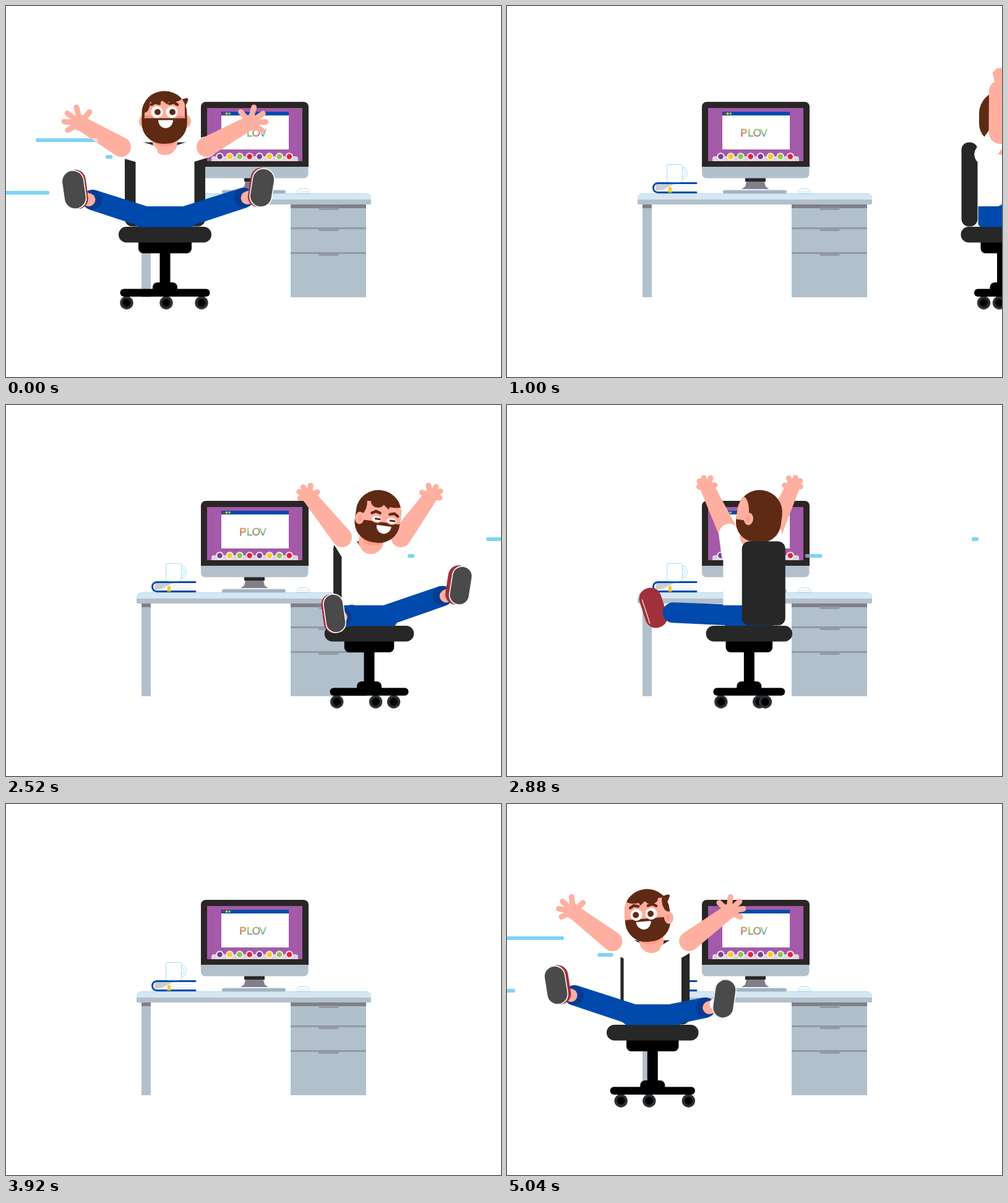
An HTML page with a canvas that plays this animation: 800 px wide and 600 px high, repeating every 5.08 s.

```html
<!DOCTYPE html>
<html lang="en">
<head>
<meta charset="utf-8">
<title>Office chair spin</title>
<style>
html, body { margin: 0; width: 100%; height: 100%; overflow: hidden; background: #fff; }
canvas { display: block; width: 100vw; height: 100vh; }
</style>
</head>
<body>
<canvas id="stage" width="800" height="600"></canvas>
<script>
const g = document.getElementById('stage').getContext('2d');
const LOOP = 5080, STEP = 40, SPEED = 0.5435, SPIN = 0.45, RAD = Math.PI / 180;
const SKIN = '#ffaf9f', HAIR = '#5f2a14', BLUE = '#004aad', CUFF = '#083b92', RED = '#a0303c',
  DARK = '#272727', STEEL = '#b2c0cb', EDGE = '#9299a6', SHADE = '#807f8a', GLOW = '#8dd3f4';

// Limb poses for every 18 degrees of turn, from facing front to facing away
const ARMS = {
  left: {
    endX: [-71, -59, -44, -26, -12, -3, 15, 32, 49, 60, 69],
    handX: [-137, -123, -97, -60, -34, -4, 30, 68, 105, 128, 137]
  },
  right: {
    endX: [67, 65, 51, 38, 15, -3, -15, -36, -57, -64, -69],
    handX: [137, 128, 99, 62, 30, -4, -40, -70, -107, -126, -137]
  },
  endY: [228, 222, 214, 209, 206, 204, 206, 209, 213, 222, 228],
  handY: [189, 174, 148, 131, 131, 138, 131, 133, 150, 174, 189],
  reach: [27, 25, 19, 16, 25, 34, 25, 17, 19, 25, 27]
};
const LEGS = {
  left: {
    x: [-147, -116, -56, 6, 55, 100, 130, 155, 168, 168, 152],
    y: [297, 315, 337, 349, 350, 345, 338, 328, 310, 303, 297]
  },
  right: {
    x: [157, 156, 148, 138, 115, 85, 40, -25, -88, -130, -152],
    y: [294, 293, 292, 290, 288, 285, 283, 283, 286, 291, 297]
  }
};

function at(keys, deg) {
  const p = deg / 18, i = Math.min(Math.floor(p), keys.length - 2);
  return keys[i] + (keys[i + 1] - keys[i]) * (p - i);
}
function box(x, y, w, h, color, r = 0) {
  g.fillStyle = color;
  g.beginPath();
  g.roundRect(x, y, w, h, r);
  g.fill();
}
function oval(x, y, rx, ry, color, sweep = 7) {
  g.fillStyle = color;
  g.beginPath();
  g.ellipse(x, y, rx, ry, 0, 0, sweep);
  g.fill();
}
const disc = (x, y, r, color) => oval(x, y, r, r, color);
function poly(points, color) {
  g.fillStyle = color;
  g.beginPath();
  points.forEach(p => g.lineTo(...p));
  g.fill();
}
function line(points, color, width) {
  g.strokeStyle = color;
  g.lineWidth = width;
  g.lineCap = g.lineJoin = 'round';
  g.beginPath();
  points.forEach(p => g.lineTo(...p));
  g.stroke();
}
// Tapered capsule between two circles
function limb(x1, y1, r1, x2, y2, r2, color) {
  const d = Math.atan2(y2 - y1, x2 - x1), len = Math.hypot(x2 - x1, y2 - y1) || 1;
  const k = Math.acos(Math.max(-1, Math.min(1, (r1 - r2) / len)));
  g.fillStyle = color;
  g.beginPath();
  g.arc(x1, y1, r1, d + k, d - k + 2 * Math.PI);
  g.arc(x2, y2, r2, d - k, d + k);
  g.fill();
}

function drawDesk() {
  box(219, 320, 15, 151, STEEL);
  box(219, 320, 15, 7, SHADE);
  box(460, 320, 122, 151, STEEL);
  box(460, 320, 122, 7, SHADE);
  box(460, 327, 1, 144, GLOW);
  for (const y of [327, 361, 401]) {
    if (y > 327) box(460, y - 3, 122, 3, EDGE);
    box(505, y - 1, 33, 4, EDGE, [0, 0, 3, 3]);
  }
  box(211, 303, 379, 18, STEEL, [8, 8, 2, 2]);
  box(211, 303, 379, 10, '#d6e6f2', [8, 8, 0, 0]);
  line([[218, 303.5], [582, 303.5]], GLOW, 0.6);
}

function drawComputer() {
  box(385, 278, 33, 6, '#2b2626');
  poly([[387, 284], [416, 284], [418, 292], [425, 297], [378, 297], [385, 292]], SHADE);
  box(349, 298, 103, 5, '#a7b2bf', 2);
  box(353, 296, 96, 2, '#e4f3fb');
  box(315, 250, 173.5, 28.5, STEEL, [0, 0, 7, 7]);
  box(315, 155, 174, 105, '#2b2626', [8, 8, 0, 0]);
  box(325, 165, 154, 86, '#a45aa8');
  box(348, 171, 109, 61, '#fff');
  box(348, 171, 109, 6, BLUE);
  ['#e8203c', '#ffd02a', '#8bc84a'].forEach((c, i) => disc(352 + i * 4.6, 174, 1.9, c));
  g.font = '17px "Liberation Sans", Arial, sans-serif';
  g.textAlign = 'center';
  [...'PLOV'].forEach((ch, i) => {
    const x = 383 + i * 10.7, fade = g.createLinearGradient(0, 198, 0, 211);
    fade.addColorStop(0, ['#ff9d2e', '#ffc81f', '#8bc84a', '#ffd02a'][i]);
    fade.addColorStop(1, ['#e84c3c', '#5cb85c', '#e8503c', '#3fa9e0'][i]);
    g.lineWidth = 0.8;
    g.strokeStyle = GLOW;
    g.strokeText(ch, x, 210.5);
    g.fillStyle = fade;
    g.fillText(ch, x, 210.5);
  });
  box(332, 243, 140, 8, '#ddd4df', [4, 4, 0, 0]);
  for (let i = 0; i < 8; i++) {
    const x = 345.5 + i * 16.05;
    disc(x, 243.5, 6.2, '#f4eef4');
    disc(x, 243.5, 4.3, ['#7b3f9c', '#ffc91f', '#8bc84a', '#e8203c'][i % 4]);
  }
}

function drawClutter() {
  box(470.5, 295.5, 20, 7.5, '#fff', [9, 9, 2, 2]);
  g.strokeStyle = GLOW;
  g.lineWidth = 0.8;
  g.stroke();
  line([[474, 300], [488, 300]], '#d5dce3', 1);

  box(240, 287, 66, 14, '#fff', [6, 0, 0, 6]);
  poly([[241, 288], [270, 288], [252, 297], [240, 299]], '#c9ccd2');
  line([[262, 292], [300, 292]], '#e3e8ed', 1);
  line([[255, 296], [300, 296]], '#e3e8ed', 1);
  g.strokeStyle = BLUE;
  g.lineWidth = 3;
  g.beginPath();
  g.moveTo(306, 286.5);
  g.lineTo(244, 286.5);
  g.bezierCurveTo(234, 286.5, 234, 301.5, 244, 301.5);
  g.lineTo(306, 301.5);
  g.stroke();
  poly([[261, 293], [266, 293], [266, 303], [263.5, 301], [261, 303]], '#ffc91f');

  g.strokeStyle = GLOW;
  g.lineWidth = 0.8;
  for (const r of [8.5, 5]) {
    g.beginPath();
    g.ellipse(283, 270, r, r + 1.5, 0, -1.6, 1.6);
    g.stroke();
  }
  box(258.5, 256.5, 25, 28.5, '#fff', [1, 1, 5, 5]);
  g.stroke();
}

function drawBase(a, flip) {
  const t = 1 - Math.abs(a - 90) / 90, e = t ** 1.3, c2 = Math.cos(a * RAD) ** 2;
  const half = 72.5 - 27 * t ** 1.2, under = 70 + 16 * c2;
  for (const x of [-62 + 32 * e, 2 + 28 * e, 59 - 64 * e]) {
    disc(x * flip, 480, 10.7, '#2a3136');
    disc(x * flip, 480, 6.5, '#000');
  }
  box(-half, 457.5, half * 2, 12.5, '#000', 6);
  box(-20, 447, 40, 14, '#000', [8, 8, 0, 0]);
  box(-8.5, 396, 17, 56, '#000');
  box(-under / 2, 376, under, 24, '#000', [0, 0, 8, 8]);
}
function drawSeat(a) {
  const w = 134 + 16 * Math.cos(a * RAD) ** 2;
  box(-w / 2, 357, w, 25.5, DARK, 12.5);
}
function drawBackrest(a) {
  const t = 1 - Math.abs(a - 90) / 90, w = 130 - 104 * t ** 1.08;
  box(-53 * t ** 1.6 - w / 2, 220.5, w, 136, DARK, 12);
}

function drawArm(side, a, sleeveOnTop) {
  const x = at(side.endX, a), y = at(ARMS.endY, a), hx = at(side.handX, a), hy = at(ARMS.handY, a);
  const dir = Math.atan2(hy - y, hx - x), turn = hx < x ? 1 : -1, reach = at(ARMS.reach, a);
  const profile = Math.max(0, 1 - Math.abs(a - 90) / 30), fan = 1 - 0.8 * profile;
  const sleeve = () => limb(Math.sign(x) * 28, 240, 17, x, y, 17, '#fff');
  if (!sleeveOnTop) sleeve();
  limb(x, y, 16 + 3 * profile, hx, hy, 11.5 + 6 * profile, SKIN);
  [-61, -26, 6, 46, 100].forEach((deg, i) => {
    const d = dir + deg * RAD * turn * fan, r = reach - (i % 4 ? 1 : 4);
    line([[hx, hy], [hx + r * Math.cos(d), hy + r * Math.sin(d)]], SKIN, 9);
  });
  disc(hx, hy, 6 + reach * 0.26, SKIN);
  if (sleeveOnTop) sleeve();
}

function drawLeg(side, a, sign) {
  const s = Math.sin(a * RAD), x = at(side.x, a), y = at(side.y, a), back = a > 90;
  const hip = sign * 35 * Math.cos(a * RAD);
  const k = 32 / Math.max(70, Math.hypot(hip - x, 340 - y));
  const cx = x + (hip - x) * k, cy = y + (340 - y) * k + 5;
  const tilt = (back ? (sign < 0 ? 18 : -20) : (sign < 0 ? -8 : 9)) * RAD;
  const pants = () => limb(hip, 340, 17, cx, cy, 16.5, BLUE);
  const shoe = () => {
    g.save();
    g.translate(x, y);
    g.rotate(tilt);
    if (back) {
      box(-18, -33, 36, 66, RED, 17);
      if (sign < 0) line([[13, -18], [13, 22]], '#e8d0d2', 1.5);
    } else {
      const off = sign < 0 ? 4 - 11 * s : -4 - 3 * s, half = 17 - 3 * s;
      box(off - 17, -32, 34, 64, RED, 17);
      box(-half - 1.5, -32, half * 2 + 3, 64, '#fff', half + 1);
      box(-half, -30.5, half * 2, 61, '#4a4a4a', half);
    }
    g.restore();
  };
  if (back) {
    shoe();
    pants();
    return;
  }
  pants();
  disc(cx, cy, 15.5, CUFF);
  limb(cx - (cx - x) * 0.2, cy, 10.5, x, y + 8, 10, SKIN);
  const sx = x + (cx - x) * 0.45, sy = y + (cy - y) * 0.6;
  limb(sx, sy, 10, x, y + 8, 10, '#fff');
  shoe();
}

function drawTorso(a) {
  const half = 39 + 8.5 * Math.cos(a * RAD) ** 2;
  box(-half, 228, half * 2, 97, '#fff', [22, 22, 0, 0]);
  box(-half, 324, half * 2, 33.5, BLUE, [0, 0, 6, 6]);
}

function drawFace(s) {
  const f = 18 * s, ey = -9 + 21 * s, squint = s > 0.5, tone = '#ff8f85';
  oval(f - 25, ey + 11, 8, 6, tone);
  oval(f + 26, ey + 11, 8, 6, tone);
  box(-40, 1 + 12 * s, 80, 60, HAIR);
  for (const side of [-1, 1]) {
    const x = f + side * 12, bx = x + side * 3, lift = squint ? 4 : 0;
    if (squint) {
      oval(x, ey, 9.5, 7, SKIN);
      oval(x, ey + 0.5, 8, 4.5, '#fff');
      line([[x - 2, ey + 0.5], [x + 5, ey + 0.5]], HAIR, 3);
    } else {
      disc(x, ey, 9.5, '#fff');
      disc(x + 1, ey, 5, HAIR);
    }
    line([[bx + side * 6, ey - 12 + lift], [bx, ey - 15.5 + lift], [bx - side * 7, ey - 13.5 + lift]], HAIR, 4.5);
  }
  oval(f * 0.9 + 2, 4 + 16 * s, 12, 13, '#fff', Math.PI);
}

function drawHead(a, flip) {
  const s = Math.sin(a * RAD), c = Math.cos(a * RAD), sway = Math.sin(2 * a * RAD);
  const ear = c < 0 ? -28 * c : -36 * c, front = a < 10;
  limb(sway * 5, 212, 20, sway * 3, 221, a > 90 ? 12 : 20, SKIN);
  if (a <= 90) oval(sway * 8, 219, 17, 8, '#ff9a8c');
  g.save();
  g.translate(16 * sway - 1, 180.5);
  g.rotate(8 * sway * RAD);
  if (front) {
    oval(-34, 6, 7, 10, SKIN);
    oval(36, 6, 7, 10, SKIN);
  }
  if (a < 30) limb(flip * 30, -24, 6, flip * 36, -29, 2.5, HAIR);
  g.save();
  g.beginPath();
  g.roundRect(-36.5, -43, 73, 85, [36, 36, 33, 33]);
  g.clip();
  box(-40, -45, 80, 90, HAIR);
  const left = front ? -32 : ear;
  if (a <= 100) {
    const f = 18 * s, top = -31 + 13 * s;
    box(left, top, (front ? 33 : 40) - left, 60, SKIN);
    drawFace(s);
    // Fringe and sideburn
    oval(left, top + 6, 9, 17, HAIR);
    oval(f - 14, top, 11, 9, HAIR);
    oval(f + 12, top - 1, 16, 7, HAIR);
    poly([[f - 8, top], [f + 8, top], [f + 5, top + 10]], HAIR);
  } else if (ear < 34) {
    oval(ear + 16, -2, 15, 28, SKIN);
    box(ear - 2, 9, 40, 40, HAIR, 8);
  }
  g.restore();
  if (!front && a < 165) {
    oval(ear, 6, 7.5, 10, SKIN);
    oval(ear + 1, 6, 3, 5, '#ff9a8c');
  }
  g.restore();
}

function drawMan(x, yaw) {
  const turn = ((yaw + 180) % 360 + 360) % 360 - 180, a = Math.abs(turn), flip = turn < 0 ? -1 : 1;
  g.save();
  g.translate(x, 0);
  g.scale(flip, 1);
  if (a <= 90) {
    drawBase(a, 1);
    drawBackrest(a);
    drawSeat(a);
    drawArm(ARMS.right, a, false);
    drawTorso(a);
    drawLeg(LEGS.right, a, 1);
    drawLeg(LEGS.left, a, -1);
    drawHead(a, flip);
    drawArm(ARMS.left, a, false);
  } else {
    drawLeg(LEGS.right, a, 1);
    drawLeg(LEGS.left, a, -1);
    drawArm(ARMS.right, a, true);
    drawArm(ARMS.left, a, true);
    drawTorso(a);
    drawHead(a, flip);
    drawBase(a, -1);
    drawBackrest(a);
    drawSeat(a);
  }
  g.restore();
}

// Speed streaks: the head shoots forward, the tail catches up
function streak(s, t, dir) {
  const q = (t - s.start) / s.period, k = Math.floor(q), r = 1 - q + k;
  const goal = s.goal + dir * s.shift * k;
  const head = goal - dir * s.head * r ** s.pow;
  const gap = Math.max(5, s.tail * r * r - s.head * r ** s.pow);
  return [[head - dir * 3, s.y], [head - dir * (gap + 3), s.y]];
}
const RIGHTWARD = [
  { y: 217, start: -40, period: 400, goal: 277, shift: 217, head: 185, pow: 3.5, tail: 275 },
  { y: 244, start: -360, period: 400, goal: 172, shift: 217, head: 300, pow: 4, tail: 490 },
  { y: 302, start: -40, period: 400, goal: 404, shift: 217, head: 391, pow: 1.5, tail: 500 }
];
const LEFTWARD = [
  { y: 217, start: 2140, period: 760, goal: 751, shift: 568, head: 200, pow: 3, tail: 660 },
  { y: 244, start: 2130, period: 420, goal: 649, shift: 168, head: 300, pow: 4, tail: 490 },
  { y: 302, start: 2140, period: 760, goal: 813, shift: 568, head: 200, pow: 3, tail: 412 }
];

function render(t) {
  const left = t >= 1800 && t < 3920, right = t < 1320 || t >= 4280;
  const local = left ? t - 2520 : t >= 4280 ? t - LOOP : t;
  const streaks = left ? LEFTWARD.map(s => streak(s, t, -1))
    : right && local < 760 ? RIGHTWARD.map(s => streak(s, local, 1)) : [];
  g.fillStyle = '#fff';
  g.fillRect(0, 0, 800, 600);
  streaks.forEach(p => line(p, '#00a7ef', 6));
  drawDesk();
  drawComputer();
  drawClutter();
  if (left) drawMan(587 - SPEED * local, 36 - SPIN * local);
  if (right) drawMan(257 + SPEED * local, SPIN * local);
  streaks.forEach(p => line(p, 'rgba(255,255,255,.5)', 6));
}

const begin = performance.now();
function tick() {
  const t = (performance.now() - begin) % LOOP;
  render(Math.floor(t / STEP) * STEP);
  requestAnimationFrame(tick);
}
tick();
</script>
</body>
</html>
```
